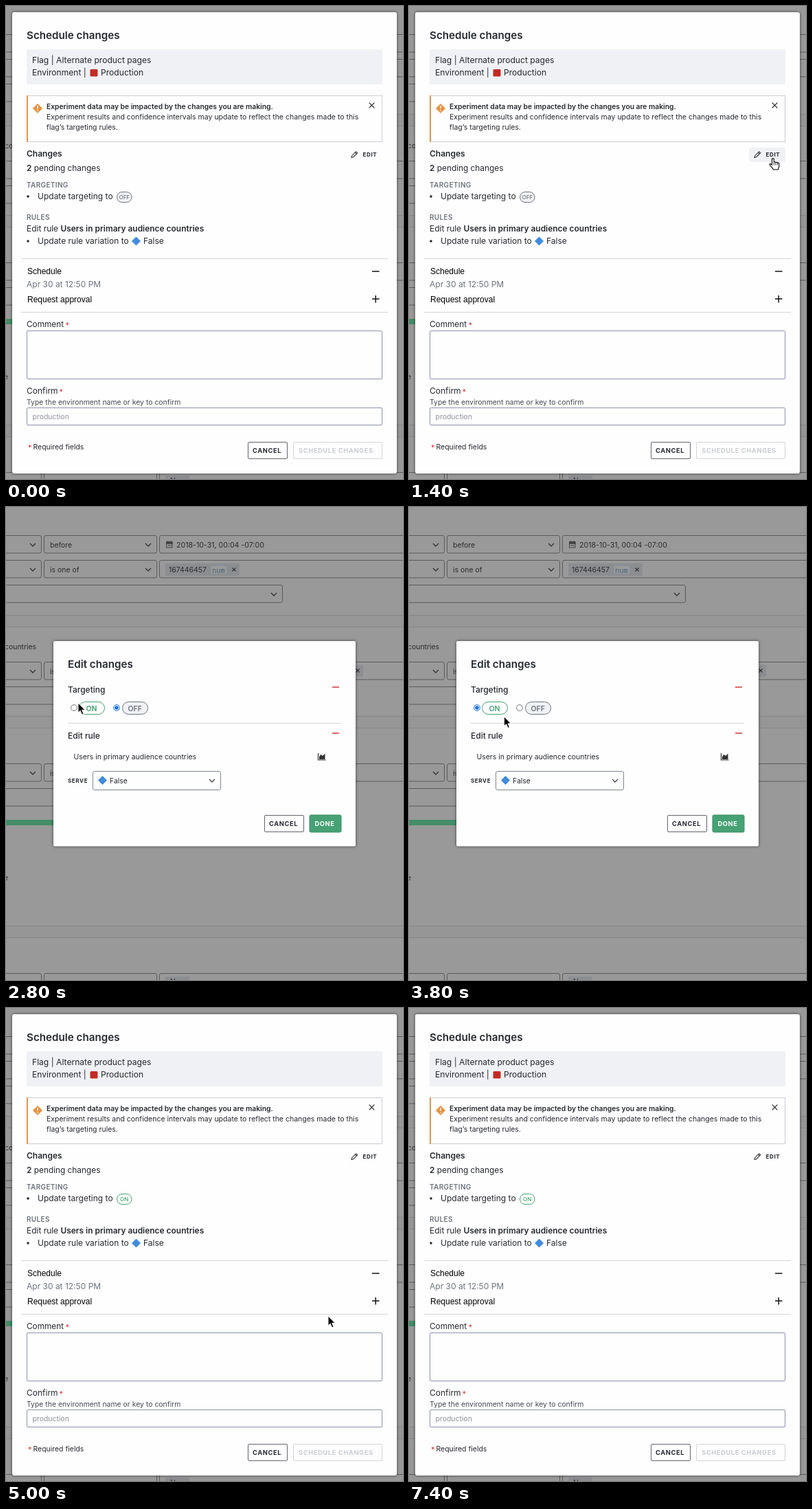
An HTML page for the animation above (7.6 s loop, 578 by 688 pixels).

```html
<!DOCTYPE html>
<html lang="en">
<head>
<meta charset="utf-8">
<title>Schedule changes</title>
<style>
html, body { margin: 0; width: 100%; height: 100%; overflow: hidden; background: #999; }
svg { display: block; width: 100%; height: 100%; }
text { font-family: Inter, sans-serif; font-optical-sizing: none; white-space: pre; }
.modal { filter: drop-shadow(0 0 2px rgba(0, 0, 0, .6)); }
</style>
</head>
<body>
<svg id="stage" viewBox="0 0 578 688"></svg>
<script>
const INK = '#25282e', GRAY = '#6c727c', GREEN = '#41a071', RED = '#c8383c', BLUE = '#428bdc';
const PAGE_LINE = '#5a5b5e', PAGE_INK = '#2b2d31';

// Text is placed by the vertical middle of its capitals.
const text = (x, y, str, { size = 12, weight = 400, fill = INK, spacing = 0, family = '' } = {}) =>
  `<text x="${x}" y="${y + size * .36}" font-size="${size}" font-weight="${weight}" fill="${fill}"
    letter-spacing="${spacing}" ${family && `style="font-family:${family}"`}>${str}</text>`;
const box = (x1, y1, x2, y2, fill, stroke = 'none', r = 0) =>
  `<rect x="${x1}" y="${y1}" width="${x2 - x1}" height="${y2 - y1}" rx="${r}" fill="${fill}" stroke="${stroke}"/>`;
const path = (d, stroke, width = 1, fill = 'none') =>
  `<path d="${d}" stroke="${stroke}" stroke-width="${width}" fill="${fill}"/>`;
const group = (id, content, cls = '') => `<g id="${id}" class="${cls}">${content}</g>`;

const caps = (x, y, str, fill = INK, size = 9.3) =>
  text(x, y, str, { size, weight: 700, fill, spacing: .62 });
const heading = (x, y, str) => text(x, y, str, { size: 15.2, weight: 600 });
const small = (x, y, str, fill = INK, weight = 400) => text(x, y, str, { size: 10.45, fill, weight });
const plain = (x, y, str) =>
  text(x, y, str, { fill: '#000', family: "'Liberation Sans',Arial,sans-serif" });
const diamond = (x, y, r, fill) => path(`M${x} ${y - r}l${r} ${r}l${-r} ${r}l${-r} ${-r}Z`, fill, 1, fill);
const chevron = (x, y, color) => path(`M${x - 4} ${y - 2}l4 4l4-4`, color, 1.3);
const cross = (x, y, r, color) =>
  path(`M${x - r} ${y - r}l${2 * r} ${2 * r}M${x + r} ${y - r}l${-2 * r} ${2 * r}`, color, 1.2);
const bullet = y => `<circle cx="32" cy="${y}" r="1.8" fill="${INK}"/>`;
const radio = (x, y, checked) =>
  `<circle cx="${x}" cy="${y}" r="4.4" fill="#fff" stroke="${checked ? '#1b72e8' : '#777'}"/>` +
  (checked ? `<circle cx="${x}" cy="${y}" r="2.8" fill="#1b72e8"/>` : '');

function page() {
  const field = (x1, y, x2) => box(x1 + .5, y + .5, x2 - .5, y + 26, '#999', PAGE_LINE, 2.5);
  const select = (x1, y, x2) => field(x1, y, x2) + chevron(x2 - 13, y + 14, '#333');
  const row = (y, label) => select(-80, y, 52) + select(55, y, 220) + field(223, y, 700) +
    small(64, y + 14, label, PAGE_INK);
  const gap = (y1, y2) => box(-5, y1 + .5, 600, y2 + .5, '#969696', '#87858b');
  const hatch = Array.from({ length: 18 }, (_, i) => `M${i * 4} 463l3-8`).join('');
  return box(0, 0, 578, 688, '#999') +
    gap(157, 174) + gap(304, 321) + gap(609, 626) +
    row(41, 'before') + row(77, 'is one of') + select(-80, 113, 403) +
    box(233.5, 50.5, 242, 59, 'none', '#444') + box(233, 51, 242.5, 54, '#444') +
    path('M235.5 49v3M240 49v3M235 56h6', '#444') +
    text(248, 55, '2018-10-31, 00:04 -07:00', { size: 10.6, fill: PAGE_INK }) +
    box(232, 82, 340, 100, '#8c8d90', 'none', 2) + small(237, 91, '167446457', PAGE_INK) +
    box(297.5, 85, 322, 98, '#999', '#7d8c95', 2) +
    text(300, 92, 'num', { size: 10.4, fill: '#456377', family: "'Liberation Mono',monospace" }) +
    cross(332, 91, 2.5, '#333') +
    small(-2, 203, 'countries', PAGE_INK) +
    row(225, 'is one of') + box(480, 230, 520, 247, '#8c8d90', 'none', 2) + cross(512, 238, 2.5, '#333') +
    field(-80, 261, 403) +
    row(373, 'is one of') + field(-80, 409, 403) + small(-3, 422, 't', '#2f6b66') +
    box(0, 455, 403, 463, '#418c66') + path(hatch, '#55987a', .6) +
    small(-3, 539, 'e', PAGE_INK) +
    row(678, 'is one of') + box(232, 683, 267, 700, '#8c8d90', 'none', 2) + small(239, 690, 'No', PAGE_INK);
}

function scheduleModal() {
  const alertLine = (y, str, weight) => text(59, y, str, { size: weight ? 10.3 : 10.5, weight });
  const section = (y, str) => text(30, y, str, { size: 10, weight: 600, fill: GRAY, spacing: .35 });
  const badge = (id, str, x, color, fill) => group(id,
    box(161.5, 270.5, 183, 285.5, fill, color, 7.5) + text(x, 278, str, { size: 8, weight: 500, fill: color }));
  const star = (x, y) => text(x, y + 1, '*', { size: 11, fill: '#d2393c' });
  return box(9, 9, 569, 680, '#fefefe', 'none', 3) +
    heading(30, 42.5, 'Schedule changes') +
    box(30, 63, 548, 114, '#f0f1f5') +
    text(38, 79, 'Flag | Alternate product pages', { size: 12.1 }) +
    text(38, 97, 'Environment |', { size: 12.1 }) + box(122.5, 92, 133.5, 102.5, '#c32c24', 'none', 1.5) +
    text(138, 97, 'Production', { size: 12.1 }) +
    box(30.5, 130.5, 547.5, 197.5, '#fefefe', '#cbced4') + box(30, 130, 32, 198, '#e8954a') +
    diamond(46, 149, 6.5, '#e8913e') + path('M46 145v4.5M46 151.2v1.6', '#fff', 1.5) +
    alertLine(146, 'Experiment data may be impacted by the changes you are making.', 600) +
    alertLine(161, 'Experiment results and confidence intervals may update to reflect the changes made to this') +
    alertLine(176, 'flag’s targeting rules.') + cross(532.5, 144.5, 3.8, '#222') +
    text(30, 215, 'Changes', { weight: 600 }) +
    group('editHover', box(495, 206, 548, 227, '#f0f1f5', 'none', 2)) +
    path('M503 220.5l.7-2.8l6-6l2 2l-6 6ZM508.3 213l2 2', '#333', 1.1) + caps(519.5, 216, 'EDIT', INK, 8) +
    text(30, 236, '<tspan font-weight="600">2</tspan> pending changes', { size: 11.85 }) +
    section(260, 'TARGETING') + bullet(277) + text(46, 277, 'Update targeting to') +
    badge('badgeOff', 'OFF', 164.5, GRAY, '#f2f3f6') + badge('badgeOn', 'ON', 166, GREEN, '#fefefe') +
    section(307.5, 'RULES') +
    text(30, 324, 'Edit rule <tspan font-weight="600">Users in primary audience countries</tspan>', { size: 11.95 }) +
    bullet(342) + text(46, 342, 'Update rule variation to') + diamond(189.5, 342, 6, BLUE) + text(200, 342, 'False') +
    path('M22 367.5H556M22 445.5H556', '#d3d5d9') +
    plain(31, 386, 'Schedule') + path('M533 386h10.5', '#111', 1.5) +
    text(30, 405, 'Apr 30 at 12:50 PM', { fill: GRAY }) +
    plain(31, 427, 'Request approval') + path('M533 426h10.5M538.2 421v10.5', '#111', 1.5) +
    text(30, 463, 'Comment', { size: 11.8 }) + star(86.5, 463) +
    box(30.5, 472.5, 547.5, 542.5, '#fefefe', '#8d92ac', 1.5) +
    text(30, 560, 'Confirm') + star(77.5, 560) +
    small(30, 576.5, 'Type the environment name or key to confirm', '#454a53') +
    box(30.5, 584.5, 547.5, 609.5, '#fefefe', '#8d92ac', 1.5) + small(38.5, 597.5, 'production', '#8d9198') +
    star(32, 641) + small(39.5, 641.5, 'Required fields') +
    box(352.5, 634.5, 409.5, 658.5, '#fefefe', '#62656d', 1.5) + caps(359, 647, 'CANCEL') +
    box(418.5, 634.5, 547.5, 658.5, '#fefefe', '#d3d5da', 1.5) + caps(426, 647, 'SCHEDULE CHANGES', '#c9ccd1');
}

function editModal() {
  const pill = (x, str, color, fill) => box(x + .5, 283.5, x + 37.5, 301.5, fill, color, 9) +
    small(x + (str === 'ON' ? 10.5 : 8.5), 293, str, color, 600);
  return box(69, 195, 509, 493.5, '#fefefe', 'none', 2) +
    heading(90, 228.5, 'Edit changes') +
    text(90, 266, 'Targeting', { weight: 500 }) + path('M475 262h10M475 329h10', RED, 1.5) +
    group('radioOn', radio(99, 292, true) + radio(161, 292, false)) +
    group('radioOff', radio(99, 292, false) + radio(161, 292, true)) +
    pill(106, 'ON', GREEN, '#fefefe') + pill(169, 'OFF', GRAY, '#f0f1f5') +
    path('M90 314.5H488', '#d3d5d9') +
    text(90, 333, 'Edit rule', { weight: 500 }) +
    small(98.5, 363.5, 'Users in primary audience countries') +
    path('M454.5 358v10h11', '#333', 1.2) + path('M456 367v-4l2.5-3l2.5 2l3.5-3.5v8.5Z', 'none', 0, '#333') +
    caps(90, 398, 'SERVE', INK, 8) + box(126.5, 384.5, 312.5, 411.5, '#fefefe', '#7f8593', 2.5) +
    diamond(140.5, 397.5, 6, BLUE) + small(151, 398, 'False') + chevron(300, 398, '#444') +
    box(376.5, 448.5, 433.5, 472.5, '#fefefe', '#62656d', 1.5) + caps(383, 461, 'CANCEL') +
    box(442, 448, 488, 473, '#46a174', '#3b8f65', 2) +
    group('doneHover', box(442, 448, 488.5, 473, '#34805c', '#9cc9d6', 2)) +
    caps(449.5, 461, 'DONE', '#fff');
}

const ARROW = 'M0 0V14.2l3.2-3l2.4 5.6l2.4-1l-2.4-5.5h4.4Z';
const HAND = 'M-.5 13V5a1.4 1.4 0 0 1 2.8 0v4.5a1.4 1.4 0 0 1 2.6.3a1.4 1.4 0 0 1 2.5.5a1.4 1.4 0 0 1 2.4 1' +
  'V15c0 2-1 3-1.5 5H1.5C0 17-2.5 15.5-3.7 13c-.8-1.5 1.2-2.2 3.2 0Z';

document.getElementById('stage').innerHTML = page() +
  group('schedule', scheduleModal(), 'modal') + group('edit', editModal(), 'modal') +
  group('cursor', group('arrow', path(ARROW, '#fff', 1, '#000')) +
    group('hand', path(HAND, '#000', 1.1, '#fff') + path('M2.3 10v3.5M4.9 10.5v3M7.4 11v2.5', '#000', .8)));

const LOOP = 7600, STEP = 200;
const OPEN_EDIT = 1600, SWITCH_ON = 3200, CLOSE_EDIT = 5000;
// Pointer stops: time, x, y
const stops = [[600, 590, 330], [1200, 529, 218], [1800, 529, 218], [2800, 105, 285], [3000, 100, 288],
  [3600, 100, 288], [4600, 469, 448], [5800, 469, 448], [6600, 592, 520]];

function pointerAt(t) {
  const i = stops.findIndex(stop => stop[0] > t);
  if (i < 1) return null;
  const [t0, x0, y0] = stops[i - 1], [t1, x1, y1] = stops[i];
  const p = (t - t0) / (t1 - t0), ease = p * p * (3 - 2 * p);
  return [x0 + (x1 - x0) * ease, y0 + (y1 - y0) * ease];
}

const show = (id, visible) => document.getElementById(id).setAttribute('display', visible ? 'inline' : 'none');
const inside = (p, x1, y1, x2, y2) => !!p && p[0] >= x1 && p[0] <= x2 && p[1] >= y1 && p[1] <= y2;

function draw(now) {
  const t = Math.floor(now % LOOP / STEP) * STEP;
  const editing = t >= OPEN_EDIT && t < CLOSE_EDIT, on = t >= SWITCH_ON;
  const pointer = pointerAt(t);
  const overEdit = !editing && inside(pointer, 495, 206, 548, 227);
  const overDone = editing && inside(pointer, 442, 446, 488, 473);
  show('schedule', !editing);
  show('edit', editing);
  show('badgeOn', on);
  show('badgeOff', !on);
  show('radioOn', on);
  show('radioOff', !on);
  show('editHover', overEdit);
  show('doneHover', overDone);
  show('cursor', pointer);
  show('hand', overEdit || overDone);
  show('arrow', !overEdit && !overDone);
  if (pointer) document.getElementById('cursor').setAttribute('transform', `translate(${pointer})`);
  requestAnimationFrame(draw);
}
draw(performance.now());
</script>
</body>
</html>
```
